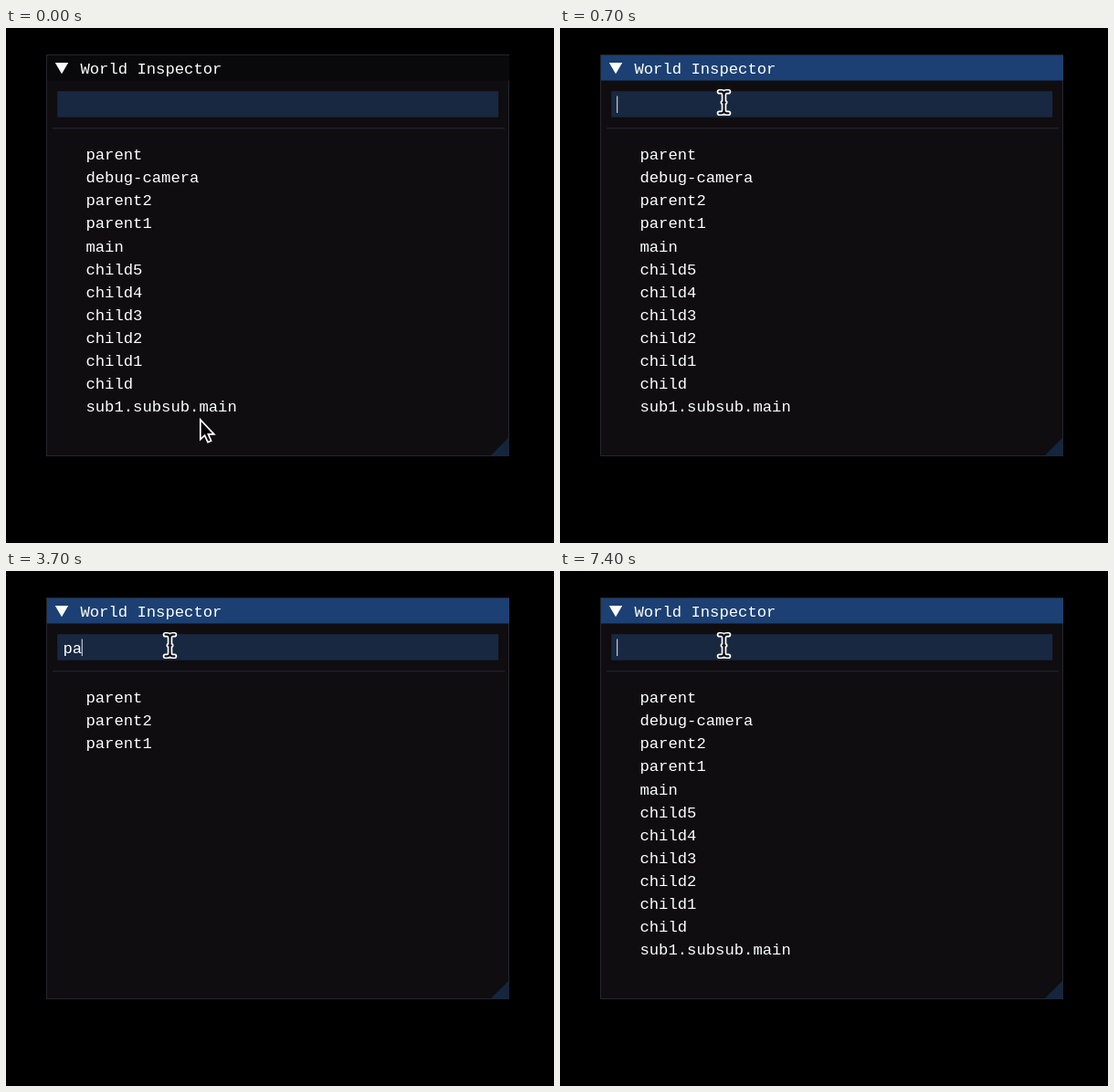
Write an HTML page that moves like this. It is 600 by 564 pixels and loops after 8100 ms.

```html
<!DOCTYPE html>
<html lang="en">
<head>
<meta charset="utf-8">
<title>World Inspector</title>
<style>
  html, body { margin: 0; width: 100%; height: 100%; overflow: hidden; background: #000; }
  svg { display: block; width: 100vw; height: 100vh; }
  text { font: 17.23px "Liberation Mono", monospace; fill: #fff; white-space: pre; }
  #beam path { fill: none; stroke-linecap: round; stroke-linejoin: round; }
  #beam .outline { stroke: #fff; stroke-width: 5.6; }
  #beam .core { stroke: #0c1018; stroke-width: 2.2; }
</style>
</head>
<body>
<svg viewBox="0 0 600 564">
  <rect x="44.5" y="29.5" width="506" height="439" fill="#0f0d10"/>
  <rect x="44.5" y="29.5" width="506" height="439" fill="none" stroke="#25262e"/>
  <rect id="bar" x="45" y="30" width="506" height="27.5"/>
  <path d="M53.8 38H68.2L61 50.2Z" fill="#fff"/>
  <text x="81.4" y="50.2">World Inspector</text>
  <rect x="56.2" y="69.2" width="483" height="28.5" fill="#182841"/>
  <text id="query" x="62.4" y="90.4"></text>
  <rect id="caret" y="74.5" width="1.2" height="18.5" fill="#c4c8d0"/>
  <rect x="51" y="109.3" width="495" height="1" fill="#292a35"/>
  <path d="M550.5 448.5V468.5H530.5Z" fill="#14263e"/>
  <rect id="hover" x="50.5" width="495" height="25.1" fill="#0c6dca"/>
  <g id="list"></g>
  <path id="arrow" d="M.8 1V22.5L5.6 18.2L9 25.6L12.6 24L9.4 16.8H15.8Z"
        fill="#000" stroke="#fff" stroke-width="1.7"/>
  <g id="beam">
    <path class="outline"/>
    <path class="core"/>
  </g>
</svg>
<script>
const LOOP = 8100, ROW_TOP = 124.4, ROW_H = 25.13, CHAR_W = 10.34;
const BLINK_ON = 800, BLINK = 1200, TYPE_HOLD = 300, FOCUS = 600;

const names = ["parent", "debug-camera", "parent2", "parent1", "main",
  "child5", "child4", "child3", "child2", "child1", "child", "sub1.subsub.main"];

// [time, pointer x, pointer y]
const moves = [[0, 212, 428], [100, 202, 350], [200, 179, 218],
  [300, 161, 118], [400, 177, 83], [600, 179.5, 81.5]];

// [time, search text]
const edits = [[0, ""], [1800, "p"], [1900, "pa"], [2100, "par"], [2200, "pare"],
  [2400, "paren"], [2500, "parent"], [3200, "paren"], [3400, "pare"], [3500, "par"],
  [3700, "pa"], [3900, "p"], [4100, ""], [4900, "d"], [5000, "de"],
  [6800, "d"], [7100, ""]];

const $ = id => document.getElementById(id);
const set = (el, attrs) => { for (const k in attrs) el.setAttribute(k, attrs[k]); };
const show = (el, on) => { el.style.display = on ? "" : "none"; };
const stepAt = (steps, t) => steps.findLast(s => s[0] <= t);

const rows = names.map((name, i) => {
  const row = document.createElementNS("http://www.w3.org/2000/svg", "text");
  row.textContent = name;
  set(row, { x: 87.4 });
  $("list").append(row);
  return row;
});

// I-beam: a stem with serifs curving out to both sides
const serif = (sx, sy) => `M${5 * sx} ${11.8 * sy}H${3 * sx}Q0 ${11.8 * sy} 0 ${8 * sy}`;
const beamShape = "M0 -8V8M-1.2 0H1.2" + serif(-1, -1) + serif(1, -1) + serif(-1, 1) + serif(1, 1);
for (const path of $("beam").children) set(path, { d: beamShape });

function drawCaret(t, since, query) {
  const age = since ? t - since - TYPE_HOLD : t - FOCUS;
  show($("caret"), t >= FOCUS && (age < 0 || age % BLINK < BLINK_ON));
  set($("caret"), { x: 62 + query.length * CHAR_W });
}

function drawPointer(t) {
  const [, x, y] = stepAt(moves, t);
  const inField = y > 69 && y < 98;
  const row = Math.floor((y - ROW_TOP + 7) / ROW_H);
  show($("beam"), inField);
  show($("arrow"), !inField);
  for (const id of ["beam", "arrow"]) set($(id), { transform: `translate(${x} ${y})` });
  show($("hover"), !inField && row >= 0 && row < names.length);
  set($("hover"), { y: ROW_TOP + row * ROW_H });
}

function draw(t) {
  const [since, query] = stepAt(edits, t);
  set($("bar"), { fill: t >= FOCUS ? "#1c4073" : "#09090b" });
  $("query").textContent = query;
  let line = 0;
  rows.forEach((row, i) => {
    const match = names[i].includes(query);
    show(row, match);
    if (match) set(row, { y: 144 + ROW_H * line++ });
  });
  drawCaret(t, since, query);
  drawPointer(t);
}

const start = performance.now();
function tick() {
  draw((performance.now() - start) % LOOP);
  requestAnimationFrame(tick);
}
tick();
</script>
</body>
</html>
```
